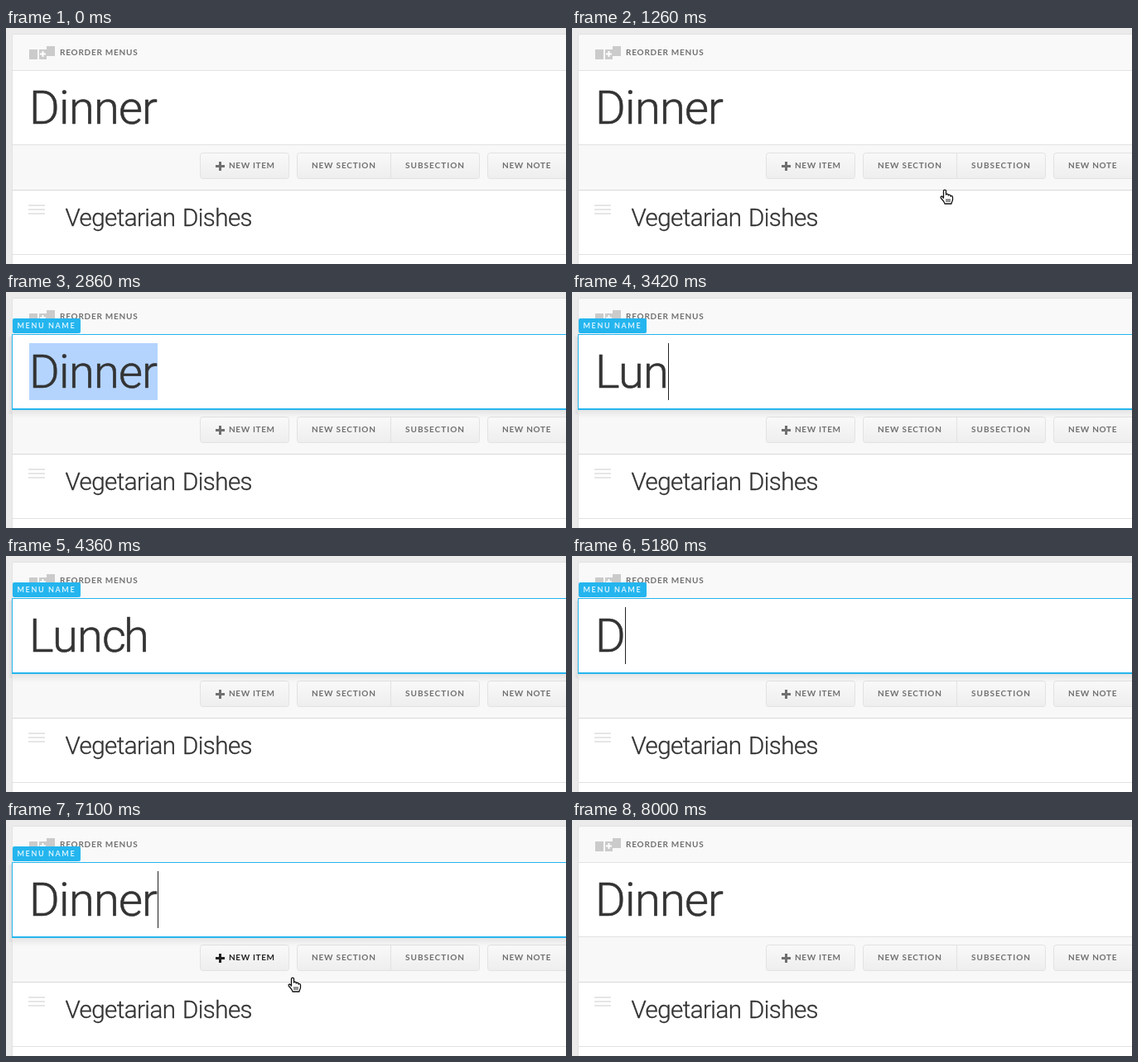
Animation of 676 by 286 pixels, one loop 8020 ms. Source, as an HTML page:

```html
<!DOCTYPE html>
<html lang="en">
<head>
<meta charset="utf-8">
<title>Menu editor</title>
<style>
  html, body { margin: 0; width: 100%; height: 100%; overflow: hidden; background: #ebebeb; }
  svg { display: block; width: 676px; height: 286px; }
  .ui { font: 700 10px Lato, sans-serif; fill: #707070; }
  .big { font-family: Roboto, sans-serif; font-weight: 300; fill: #333; stroke: #333; stroke-linejoin: round; }
  .btn { fill: url(#face); stroke: #e2e2e2; }
  .rule { stroke: #e2e2e2; }
  .cursor { fill: #fff; stroke: #111; stroke-width: 1.3; stroke-linejoin: round; }
</style>
</head>
<body>
<svg viewBox="0 0 676 286" xmlns="http://www.w3.org/2000/svg">
  <defs>
    <linearGradient id="face" x2="0" y2="1">
      <stop stop-color="#f9f9f9"/><stop offset="1" stop-color="#eeeeee"/>
    </linearGradient>
    <linearGradient id="fade" x2="0" y2="1">
      <stop stop-color="#000" stop-opacity=".08"/><stop offset="1" stop-color="#000" stop-opacity="0"/>
    </linearGradient>
    <linearGradient id="edge" x1="1" x2="0">
      <stop stop-color="#000" stop-opacity=".07"/><stop offset="1" stop-color="#000" stop-opacity="0"/>
    </linearGradient>
    <path id="beamShape" d="M-3-7.5h2l1 1 1-1H3M-3 7.5h2l1-1 1 1H3M0-7V7M-2 2.5H2"/>
  </defs>

  <rect width="676" height="286" fill="#ebebeb"/>
  <rect x="7" y="7" width="690" height="300" rx="4" fill="#e2e2e2"/>
  <rect x="8" y="8" width="690" height="300" rx="3" fill="#fff"/>
  <path d="M8 51V11q0-3 3-3H676V51z" fill="#f9f9f9"/>
  <rect x="8" y="142" width="668" height="54" fill="#f8f8f8"/>
  <path class="rule" d="M8 51.5H676M8 141.5H676M8 274.5H676"/>
  <path d="M8 196.5H676" stroke="#dadada"/>

  <path d="M28 26h10v12H28zM40 26h9v12h-9zM49 22h10v12H49z" fill="#cbcbcb"/>
  <path d="M41 31.5h7M44.5 28v7" stroke="#fff" stroke-width="2"/>
  <text class="ui" x="65" y="33" letter-spacing=".76">REORDER MENUS</text>

  <g class="btn">
    <rect x="234.5" y="151.5" width="107" height="31" rx="3"/>
    <rect x="351.5" y="151.5" width="220" height="31" rx="3"/>
    <rect x="581.5" y="151.5" width="120" height="31" rx="3"/>
  </g>
  <path class="rule" d="M464.5 152V182"/>
  <g class="ui">
    <g id="newItem">
      <path d="M257 162h3v4h4v3h-4v4h-3v-4h-4v-3h4z"/>
      <text x="269" y="170" letter-spacing=".64">NEW ITEM</text>
    </g>
    <text x="369" y="170" letter-spacing=".82">NEW SECTION</text>
    <text x="482" y="170" letter-spacing="1">SUBSECTION</text>
    <text x="599" y="170" letter-spacing=".7">NEW NOTE</text>
  </g>

  <path d="M27 215H47M27 220H47M27 225H47" stroke="#dedede" stroke-width="1.6"/>
  <text class="big" x="71.5" y="239.5" font-size="29.5" letter-spacing="-.55" word-spacing="2" stroke-width=".35">Vegetarian Dishes</text>

  <g id="focus">
    <rect x="8" y="143" width="668" height="10" fill="url(#fade)"/>
    <rect x="2" y="54" width="5" height="94" fill="url(#edge)"/>
    <rect x="8" y="32" width="82" height="18" rx="2" fill="#24b5ef"/>
    <text class="ui" x="13.5" y="44" letter-spacing="1.6" style="font-size:9px;fill:#d8f2fd">MENU NAME</text>
    <path d="M676 51.5H7.5V142" fill="none" stroke="#24b5ef"/>
    <path d="M7 142H676" stroke="#24b5ef" stroke-width="2"/>
  </g>
  <rect id="selection" x="28" y="62" height="69" fill="#b4d4fe"/>
  <text id="name" class="big" y="116" font-size="56" stroke-width=".6"></text>
  <rect id="caret" y="62" width="1" height="69" fill="#222"/>

  <g id="beam" fill="none">
    <use href="#beamShape" x=".5" y=".5" stroke="#fff" stroke-width="3"/>
    <use href="#beamShape" x=".5" y=".5" stroke="#222" stroke-width="1.1"/>
  </g>
  <g id="hand" class="cursor">
    <path d="M-1.5 1.5C-1.5-.3 1.5-.3 1.5 1.5V6C2 4.6 4.2 4.8 4.2 6.3V7C5 5.5 7 6 7 7.5V8C8 7 9.5 7.5 9.5 9V12C9.5 14 8 15 8 17H0C-.5 14-3 12.5-4.8 9.8C-5.5 8.2-3.5 7.3-2.5 8.8L-1.5 10z"/>
    <path d="M2 11v4M4 11v4M6 11v4" fill="none" stroke-width=".9"/>
  </g>
</svg>

<script>
const LOOP = 8020, LEFT = 28;
const ADVANCE = { D: 36, i: 12, n: 30, e: 28, r: 19, L: 28, u: 30, c: 26, h: 30 };

// [start time, text, selected]
const EDITS = [
  [0, "Dinner"], [2800, "Dinner", true],
  [2920, "L"], [3220, "Lu"], [3420, "Lun"], [3600, "Lunc"], [3740, "Lunch"],
  [4660, "Lunch", true],
  [5180, "D"], [5360, "Di"], [5580, "Din"], [5800, "Dinn"], [6200, "Dinne"], [6420, "Dinner"]
];
const CARET_ON = [[1540, 2120], [2720, 2800], [2920, 4360], [5180, 7680]];

const $ = id => document.getElementById(id);
const within = (t, a, b) => t >= a && t < b;
const show = (id, on) => $(id).setAttribute("visibility", on ? "visible" : "hidden");

// Parabola through three timed points
function through(t, [t0, a], [t1, b], [t2, c]) {
  const v = (b - a) / (t1 - t0);
  const bend = ((c - b) / (t2 - t1) - v) / (t2 - t0);
  return a + v * (t - t0) + bend * (t - t0) * (t - t1);
}

function pointer(t) {
  if (within(t, 1140, 2740)) {
    const k = (1 - Math.min(1, (t - 1140) / 400)) ** 2;
    return [223 + 467 * k, 106 + 184 * k];
  }
  if (within(t, 6880, 7350)) return [
    through(t, [6880, 223], [7100, 345], [7340, 690]),
    through(t, [6880, 106], [7100, 191], [7340, 290])
  ];
  return null;
}

function drawName(t) {
  const [, text, selected] = EDITS.findLast(e => e[0] <= t);
  const xs = [];
  let x = LEFT;
  for (const ch of text) {
    xs.push(x);
    x += ADVANCE[ch];
  }
  const name = $("name");
  if (name.textContent !== text) {
    name.textContent = text;
    name.setAttribute("x", xs.join(" "));
  }
  $("selection").setAttribute("width", x - LEFT);
  show("selection", selected);
  $("caret").setAttribute("x", x);
  show("caret", CARET_ON.some(([a, b]) => within(t, a, b)));
}

function drawPointer(t) {
  const p = pointer(t), low = p && p[1] > 143;
  show("beam", p && !low);
  show("hand", low);
  if (p) $(low ? "hand" : "beam").setAttribute("transform", `translate(${p.map(Math.round)})`);
  $("newItem").style.fill = within(t, 7010, 7120) ? "#222" : "";
  $("newItem").lastElementChild.style.fill = "inherit";
}

function render(t) {
  show("focus", within(t, 1540, 7680));
  drawName(t);
  drawPointer(t);
}

function tick() {
  render(performance.now() % LOOP);
  requestAnimationFrame(tick);
}
tick();
</script>
</body>
</html>
```
